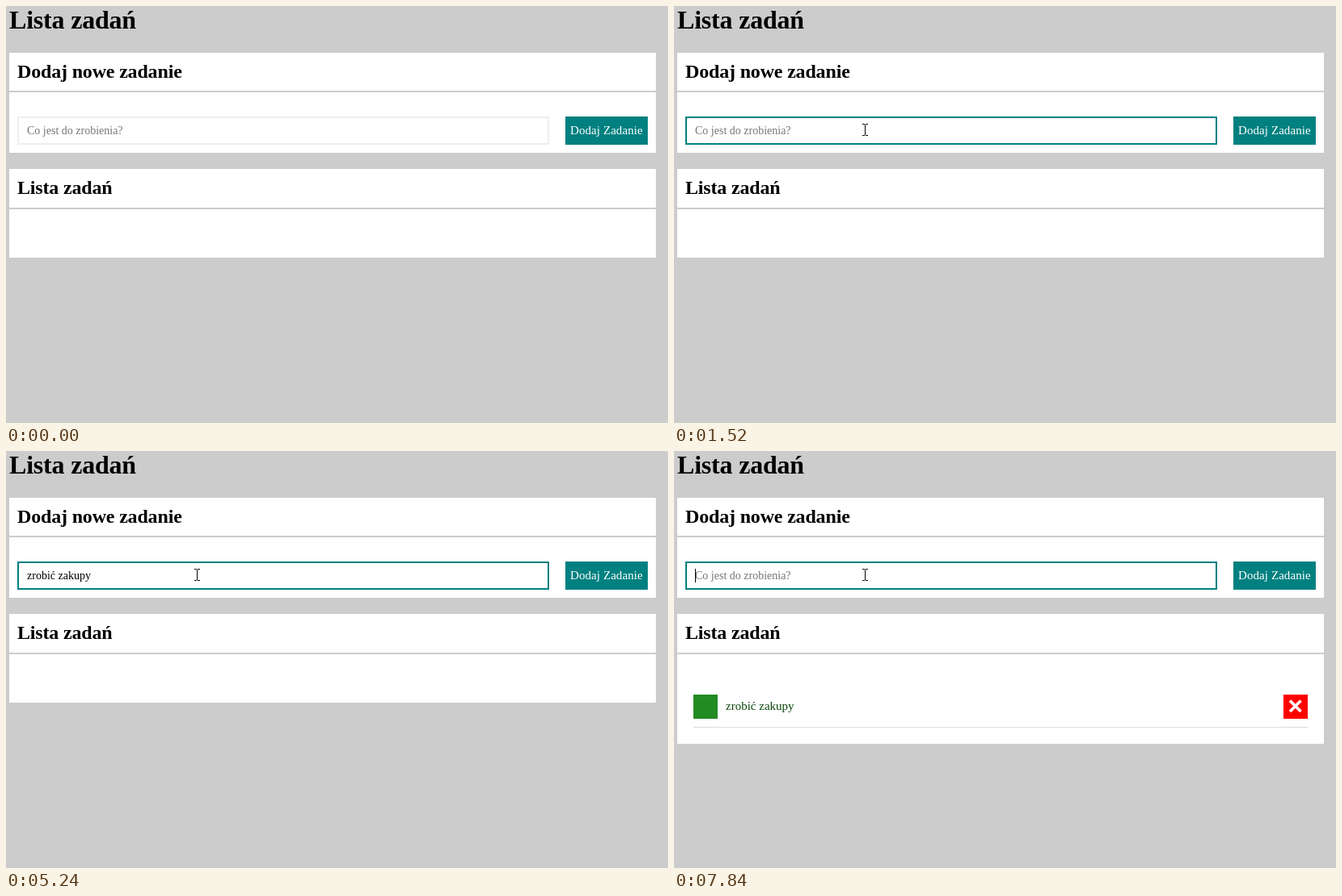
Animation of 819 by 517 pixels, one loop 8000 ms. Source, as an HTML page:

```html
<!DOCTYPE html>
<html lang="pl">
<head>
<meta charset="utf-8">
<title>Lista zadań</title>
<style>
  html, body { margin: 0; width: 100%; height: 100%; overflow: hidden; background: #ccc; }
  svg { display: block; width: 100%; height: 100%; }
  text { font-family: "Liberation Serif", "Times New Roman", serif; white-space: pre; }
  rect { shape-rendering: crispEdges; }
  .h1 { font-size: 32px; font-weight: bold; letter-spacing: -.2px; }
  .h2 { font-size: 24px; font-weight: bold; letter-spacing: -.17px; }
  .field { font-size: 14px; }
  .label { font-size: 15px; }
</style>
</head>
<body>
<svg viewBox="0 0 819 517">
  <rect width="819" height="517" fill="#ccc"/>
  <text class="h1" x="4" y="28">Lista zadań</text>

  <rect x="4" y="58" width="800" height="124" fill="#fff"/>
  <rect x="4" y="105" width="800" height="2" fill="#ccc"/>
  <text class="h2" x="14" y="89">Dodaj nowe zadanie</text>
  <rect id="box" x="15" y="138" width="656" height="33" fill="#fff" stroke-width="2"/>
  <text id="entry" class="field" x="26" y="159"></text>
  <rect id="caret" y="146" width="1" height="16"/>
  <rect x="692" y="137" width="102" height="35" fill="#008080"/>
  <text class="label" x="698" y="159" fill="#fff" letter-spacing=".08">Dodaj Zadanie</text>

  <rect id="list" x="4" y="202" width="800" height="110" fill="#fff"/>
  <rect x="4" y="250" width="800" height="2" fill="#ccc"/>
  <text class="h2" x="14" y="233">Lista zadań</text>
  <g id="task">
    <rect x="24" y="302" width="30" height="30" fill="#228b22"/>
    <text class="label" x="64" y="321" fill="#0a460a">zrobić zakupy</text>
    <rect x="754" y="302" width="30" height="30" fill="#f00"/>
    <path d="M762 309.5l13.5 13.5m0-13.5l-13.5 13.5" stroke="#fff" stroke-width="3.6"/>
    <rect x="24" y="342" width="760" height="1" fill="#ddd"/>
  </g>

  <path id="arrow" d="M.5.5v16l3.7-3.6 2.6 5.6 2.4-1.1-2.6-5.4h5.1z" fill="#fff" stroke="#000"/>
  <path id="beam" d="M-3-6.5h3m1 0h3M-3 7.5h3m1 0h3M.5-6v13" fill="none" stroke="#000" shape-rendering="crispEdges"/>
</svg>
<script>
const $ = id => document.getElementById(id);
const show = (id, on) => $(id).setAttribute("visibility", on ? "visible" : "hidden");

const LOOP = 8000, FOCUS = 990, SUBMIT = 5440;
const TASK = "zrobić zakupy";
// time of each keystroke and the caret position after it
const keys = [
  [2180, 32], [2450, 37], [2520, 44], [2720, 51], [2860, 54], [3190, 61], [3520, 64],
  [3650, 71], [3850, 77], [3980, 84], [4180, 91], [4580, 98], [4710, 105]
];
// the caret toggles at each of these times
const blinks = [FOCUS, 1520, 2050, 5240, 5720, 6250, 6760, 7310, 7840];

function drawPointer(t) {
  const step = Math.min(10, Math.floor((t - 180) / 68));
  const p = Math.max(0, step / 10), e = p * p * (3 - 2 * p);
  const x = Math.round(492 - 256 * e), y = Math.round(389 - 236 * e);
  const overField = y < 172;
  show("arrow", step >= 0 && !overField);
  show("beam", step >= 0 && overField);
  for (const id of ["arrow", "beam"]) $(id).setAttribute("transform", `translate(${x} ${y})`);
}

function drawField(t) {
  const typed = t < SUBMIT ? keys.filter(k => k[0] <= t).length : 0;
  $("entry").textContent = typed ? TASK.slice(0, typed) : "Co jest do zrobienia?";
  $("entry").setAttribute("fill", typed ? "#000" : "#757575");
  $("box").setAttribute("stroke", t < FOCUS ? "#eee" : t < 1060 ? "#77b7b7" : "#008080");
  $("caret").setAttribute("x", typed ? keys[typed - 1][1] : 26);
  $("caret").setAttribute("height", typed ? 16 : 17);
  show("caret", blinks.filter(b => b <= t).length % 2);
}

function frame(now) {
  const t = now % LOOP, added = t >= SUBMIT;
  drawPointer(t);
  drawField(t);
  show("task", added);
  $("list").setAttribute("height", added ? 161 : 110);
  requestAnimationFrame(frame);
}
frame(0);
</script>
</body>
</html>
```
